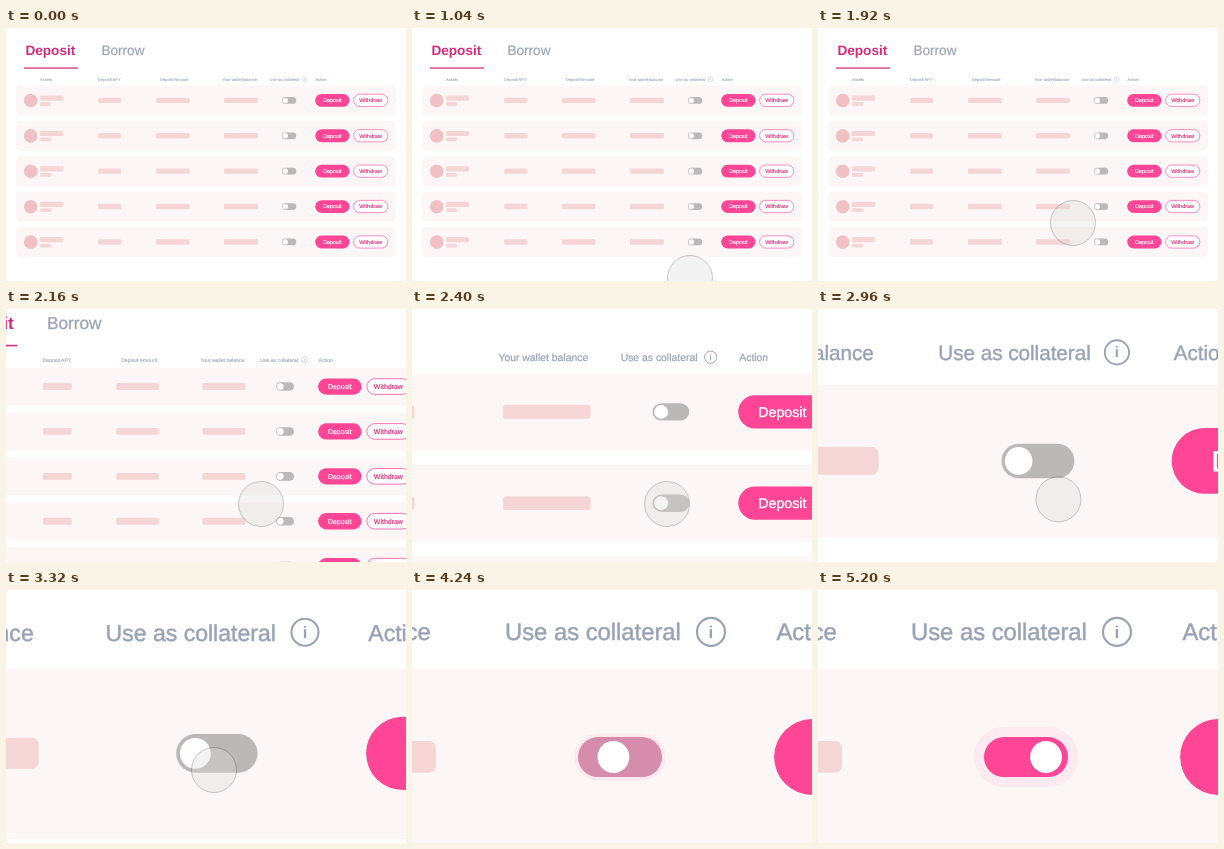
An HTML page for the animation above (6.76 s loop, 400 by 253 pixels).

```html
<!DOCTYPE html>
<html lang="en">
<head>
<meta charset="utf-8">
<title>Use as collateral</title>
<style>
  html, body { margin: 0; width: 100%; height: 100%; overflow: hidden; background: #fff; }
  svg { display: block; width: 100vw; height: 100vh; }
  text { font-family: "Liberation Sans", Arial, sans-serif; text-rendering: geometricPrecision; }
  .tab { font-size: 13.6px; fill: #9aa3b6; stroke: #9aa3b6; stroke-width: .2px; }
  .tab.on { font-weight: bold; fill: #d42a78; stroke: none; }
  .head { font-size: 4.04px; fill: #98a2b5; stroke: #98a2b5; stroke-width: .08px; }
  .label { font-size: 5.5px; text-anchor: middle; stroke-width: .15px; }
  .bar { fill: #f5d5d6; }
</style>
</head>
<body>
<svg id="stage" viewBox="0 0 400 253">
  <g id="scene"></g>
  <circle id="cursor" r="22.5" fill="rgba(217,217,217,.32)" stroke="rgba(0,0,0,.2)" stroke-width="1"/>
</svg>
<script>
const LOOP = 6760, STEP = 40;
const FOCUS = { x: 298.4, y: 53.06 }, ZOOM = 5.9;
const ROWS = 5, PITCH = 35.4;
const PINK = [255, 69, 150], GREY = [188, 184, 183];

const scene = document.getElementById('scene');
const cursor = document.getElementById('cursor');

function add(parent, tag, attrs, content) {
  const el = document.createElementNS('http://www.w3.org/2000/svg', tag);
  for (const k in attrs) el.setAttribute(k, attrs[k]);
  if (content) el.textContent = content;
  parent.appendChild(el);
  return el;
}
const box = (parent, x, y, width, height, rx, attrs) =>
  add(parent, 'rect', { x, y, width, height, rx, ...attrs });
const text = (parent, x, y, cls, str, attrs) =>
  add(parent, 'text', { x, y, class: cls, ...attrs }, str);
const rgb = c => `rgb(${c.map(Math.round).join()})`;

// Tabs and column heads
text(scene, 19.4, 26.9, 'tab on', 'Deposit');
text(scene, 95.4, 26.9, 'tab', 'Borrow');
box(scene, 18, 39.4, 54, 1.3, 0, { fill: '#d6337c' });
[[34, 'Assets'], [92, 'Deposit APY'], [153.9, 'Deposit Amount'], [216.2, 'Your wallet balance'],
 [263.6, 'Use as collateral'], [309.6, 'Action']]
  .forEach(([x, str]) => text(scene, x, 52.64, 'head', str));
add(scene, 'circle', { cx: 298.5, cy: 51.17, r: 2.37, fill: 'none', stroke: '#98a2b5', 'stroke-width': .36 });
text(scene, 298.5, 52.15, '', 'i', { 'font-size': 2.9, 'font-weight': 'bold', 'text-anchor': 'middle', fill: '#98a2b5' });

function addRow(i) {
  const g = add(scene, 'g', { transform: `translate(0 ${i * PITCH})` });
  box(g, 10, 57.5, 380, 29.85, 5, { fill: '#fdf6f6' });
  add(g, 'circle', { cx: 24.7, cy: 72.5, r: 6.8, fill: '#f0c0c4' });
  const bars = [[34, 67.5, 23, 5.2], [34, 74.1, 11, 3.8], [92.2, 69.66, 22.8, 5.4],
    [150, 69.66, 33.6, 5.4], [218, 69.66, 33.9, 5.4]];
  bars.forEach(([x, y, w, h]) => box(g, x, y, w, h, 1.2, { class: 'bar' }));

  const halo = box(g, 275.95, 69, 14.25, 6.77, 3.385, { fill: rgb(PINK), 'fill-opacity': .07 });
  const track = box(g, 275.95, 69, 14.25, 6.77, 3.385, { fill: rgb(GREY) });
  const knob = add(g, 'circle', { cx: 279.3, cy: 72.38, r: 2.7, fill: '#fff' });

  box(g, 309.2, 65.95, 34.2, 12.85, 6.425, { fill: rgb(PINK) });
  text(g, 326.3, 74.25, 'label', 'Deposit', { fill: '#fff', stroke: '#fff' });
  box(g, 347.6, 66.2, 34.2, 12.3, 6.15, { fill: '#fff', stroke: rgb(PINK), 'stroke-width': .6 });
  text(g, 364.6, 74.25, 'label', 'Withdraw', { fill: '#d6337c', stroke: '#d6337c' });
  return { halo, track, knob };
}
const [toggle] = Array.from({ length: ROWS }, (_, i) => addRow(i));

const clamp = v => Math.min(1, Math.max(0, v));
const span = (t, start, length) => clamp((t - start) / length);
const mix = (a, b, p) => a + (b - a) * p;

// cubic-bezier(.25, .1, .25, 1)
function ease(x) {
  if (x <= 0 || x >= 1) return clamp(x);
  const curve = (a, b, u) => 3 * a * u * (1 - u) ** 2 + 3 * b * u * u * (1 - u) + u ** 3;
  let lo = 0, hi = 1;
  for (let i = 0; i < 24; i++) {
    const mid = (lo + hi) / 2;
    if (curve(.25, .25, mid) < x) lo = mid; else hi = mid;
  }
  return curve(.1, 1, lo);
}
const easeOut = p => 1 - (1 - p) ** 2;
const smooth = p => p * p * (3 - 2 * p);

// start, length, x, y, easing
const moves = [
  [1040, 200, 253, 196, easeOut],
  [1400, 80, 255, 195.3, p => p],
  [1880, 40, 255, 195, p => p],
  [2760, 540, 208, 180, smooth],
];

function drawCursor(t) {
  let x = 278, y = 250;
  if (t < 360) { x = 398; y = 249; }
  for (const [start, length, tx, ty, fn] of moves) {
    const p = fn(span(t, start, length));
    x = mix(x, tx, p);
    y = mix(y, ty, p);
  }
  const shown = (t >= 320 && t < 360) || t >= 1040;
  cursor.setAttribute('cx', x);
  cursor.setAttribute('cy', y);
  cursor.setAttribute('opacity', shown ? 1 - span(t, 3840, 240) : 0);
}

function drawToggle(t) {
  const p = ease(span(t, 4100, 600));
  const grow = 1.7 * p * (t < 5200 ? .96 : 1);
  toggle.knob.setAttribute('cx', mix(279.3, 286.47, p));
  toggle.track.setAttribute('fill', rgb(GREY.map((c, i) => mix(c, PINK[i], p))));
  const size = { x: 275.95 - grow, y: 69 - grow, width: 14.25 + 2 * grow, height: 6.77 + 2 * grow, rx: 3.385 + grow };
  for (const k in size) toggle.halo.setAttribute(k, size[k]);
  toggle.halo.setAttribute('visibility', p ? 'visible' : 'hidden');
}

function draw(t) {
  const s = mix(1, ZOOM, ease(span(t, 2040, 1700)));
  scene.setAttribute('transform', `translate(${FOCUS.x * (1 - s)} ${FOCUS.y * (1 - s)}) scale(${s})`);
  drawToggle(t);
  drawCursor(t);
}

const begin = performance.now();
function tick() {
  const t = (performance.now() - begin) % LOOP;
  draw(Math.floor(t / STEP) * STEP);
  requestAnimationFrame(tick);
}
tick();
</script>
</body>
</html>
```
